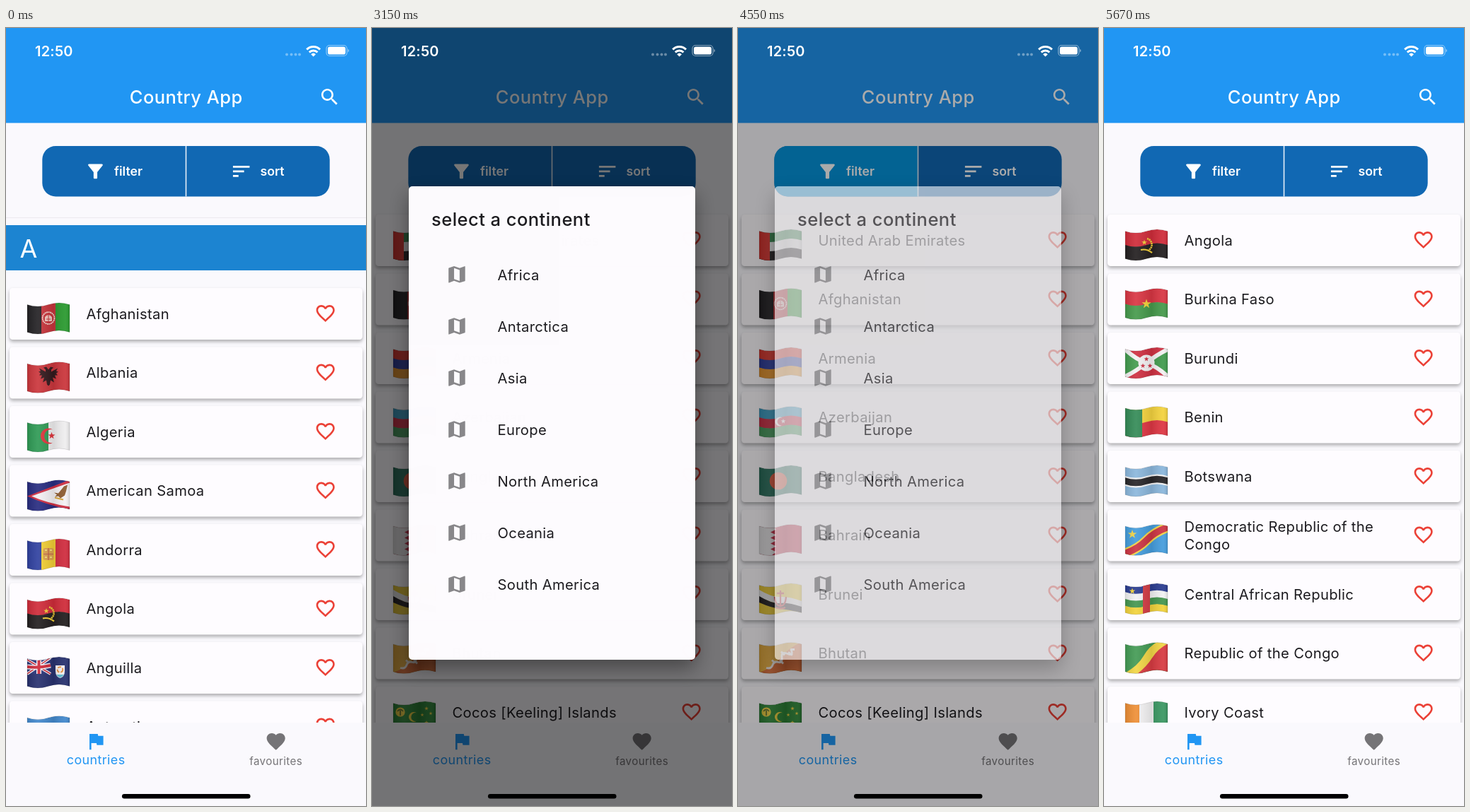
Write an HTML page that moves like this. It is 509 px wide and 1101 px high and loops after 5700 ms.

```html
<!DOCTYPE html>
<html lang="en">
<head>
<meta charset="utf-8">
<title>Country App</title>
<style>
html, body { margin: 0; width: 100%; height: 100%; overflow: hidden; background: #faf9fd; }
svg { display: block; width: 100vw; height: 100vh; }
text { font-family: Inter, Roboto, sans-serif; fill: #1c1b1f; white-space: pre; }
.label { font-size: 20.2px; letter-spacing: .33px; }
.title { font-size: 25.5px; font-weight: 500; letter-spacing: .46px; }
.button { font-size: 17.7px; font-weight: 600; }
.tab { text-anchor: middle; letter-spacing: .4px; }
.white { fill: #fff; }
.card { fill: #fefcff; filter: drop-shadow(0 3px 2.5px rgba(0, 0, 0, .3)); }
#barrier, #dialog, .list, .ripple { opacity: 0; }
.panel { fill: #fefcff; filter: drop-shadow(0 12px 14px rgba(0, 0, 0, .4)); }
</style>
</head>
<body>
<svg id="stage" viewBox="0 0 509 1101" xmlns="http://www.w3.org/2000/svg"></svg>
<script>
const LOOP = 5700;
const stage = document.getElementById('stage');

// Basic shapes
const shape = (d, fill, extra = '') => `<path d="${d}" fill="${fill}" ${extra}/>`;
const line = (d, color, width, extra = '') =>
  shape(d, 'none', `stroke="${color}" stroke-width="${width}" ${extra}`);
const rect = (x, y, w, h, fill, extra = '') =>
  `<rect x="${x}" y="${y}" width="${w}" height="${h}" fill="${fill}" ${extra}/>`;
const disc = (x, y, r, fill, extra = '') =>
  `<circle cx="${x}" cy="${y}" r="${r}" fill="${fill}" ${extra}/>`;
const text = (x, y, string, cls, extra = '') =>
  `<text x="${x}" y="${y}" class="${cls}" ${extra}>${string}</text>`;
const star = (x, y, r, fill) => {
  const points = Array.from({ length: 10 }, (_, i) => {
    const a = i * Math.PI / 5, q = i % 2 ? r * .4 : r;
    return `${(x + q * Math.sin(a)).toFixed(2)},${(y - q * Math.cos(a)).toFixed(2)}`;
  });
  return `<polygon points="${points.join(' ')}" fill="${fill}"/>`;
};
const crescent = (x, y, r, fill) => {
  const q = .86 * r, c = 1.66 * r;
  return shape(`M${x + .55 * r} ${y - c / 2}a${r} ${r} 0 1 0 0 ${c}a${q} ${q} 0 1 1 0 ${-c}z`, fill);
};

// Icons on a 24 unit grid
const HEART = 'M16.5 3c-1.74 0-3.41.81-4.5 2.09C10.91 3.81 9.24 3 7.5 3 4.42 3 2 5.42 2 8.5c0 3.78 3.4 6.86 8.55 11.54L12 21.35l1.45-1.32C18.6 15.36 22 12.28 22 8.5 22 5.42 19.58 3 16.5 3z';
const ICONS = {
  heart: HEART,
  heartLine: HEART + 'm-4.4 15.55l-.1.1-.1-.1C7.14 14.24 4 11.39 4 8.5 4 6.5 5.5 5 7.5 5c1.54 0 3.04.99 3.57 2.36h1.87C13.46 5.99 14.96 5 16.5 5c2 0 3.5 1.5 3.5 3.5 0 2.89-3.14 5.74-7.9 10.05z',
  filter: 'M4.25 5.61C6.27 8.2 10 13 10 13v6c0 .55.45 1 1 1h2c.55 0 1-.45 1-1v-6s3.72-4.8 5.74-7.39A1 1 0 0 0 18.95 4H5.04c-.83 0-1.3.95-.79 1.61z',
  sort: 'M3 18h6v-2H3zM3 6v2h18V6zm0 7h12v-2H3z',
  search: 'M15.5 14h-.79l-.28-.27C15.41 12.59 16 11.11 16 9.5 16 5.91 13.09 3 9.5 3S3 5.91 3 9.5 5.91 16 9.5 16c1.61 0 3.09-.59 4.23-1.57l.27.28v.79l5 4.99L20.49 19l-4.99-5zm-6 0C7.01 14 5 11.99 5 9.5S7.01 5 9.5 5 14 7.01 14 9.5 11.99 14 9.5 14z',
  flag: 'M14.4 6L14 4H5v17h2v-7h5.6l.4 2h7V6z',
  map: 'M20.5 3l-.16.03L15 5.1 9 3 3.36 4.9c-.21.07-.36.25-.36.48V20.5c0 .28.22.5.5.5l.16-.03L9 18.9l6 2.1 5.64-1.9c.21-.07.36-.25.36-.48V3.5c0-.28-.22-.5-.5-.5zM15 19l-6-2.11V5l6 2.11V19z'
};
const icon = (name, x, y, fill) =>
  shape(ICONS[name], fill, `fill-rule="evenodd" transform="translate(${x} ${y}) scale(1.305)"`);

// Waving flags, 60 wide: a dip on the left, a crest on the right
const wave = (y, h) => `M0 ${y}q15 5 30 0t30 0v${h}q-15-5-30 0t-30 0z`;
const TOP = 3.5, TALL = 39;
const rows = (...colors) => colors.map((c, i) =>
  shape(wave(TOP + TALL * i / colors.length, TALL / colors.length + .4), c)).join('');
const columns = (...colors) => colors.map((c, i) =>
  rect(60 * i / colors.length, 0, 60 / colors.length + .3, 46, c)).join('');
const mirrored = d => shape(d, '#33191d') + shape(d, '#33191d', 'transform="matrix(-1 0 0 1 60 0)"');

const angola = rows('#d02c3a', '#231f20') +
  line('M31 14a9 9 0 0 1 1 17', '#f2ce38', 2.6, 'stroke-dasharray="2.2 .7"') +
  line('M22 30q8-2 16 4', '#f2ce38', 2.2) + star(27, 19.5, 4, '#f2ce38');
const afghanistan = columns('#242225', '#c6343b', '#2b9a30') +
  disc(30, 22.5, 8.4, 'none', 'stroke="#f3dcd5" stroke-width="1.7" stroke-dasharray="2 .6"') +
  shape('M25 27v-6q5-6 10 0v6z', '#edc5bd') + line('M27 24h6M30 18v9', '#c6343b', 1);
const unionJack = '<g transform="translate(0 2)">' + rect(0, 0, 33, 23, '#29357b') +
  line('M0 3L33 23M33 0L0 23', '#f3f0f5', 4) + line('M0 3L33 23M33 0L0 23', '#cf2b3b', 1.5) +
  line('M16.5 0v23M0 13q16 2 33-2', '#f3f0f5', 7) + line('M16.5 0v23M0 13q16 2 33-2', '#cf2b3b', 4) + '</g>';

const FLAGS = {
  'Afghanistan': afghanistan,
  'Albania': rows('#cb363c') + mirrored('M30 12L27 8 23 9 26 12 26 15 17 10 19 14 16 15 19 17 17 20 21 20 19 25 24 23 22 30 27 27 28 33 30 35z'),
  'Algeria': columns('#2f9a55', '#efeeef') + crescent(30, 22.5, 11, '#e0343c') + star(34.5, 22, 5.2, '#e0343c'),
  'American Samoa': rows('#282c80') + shape('M60 1L0 24Q26 36 60 43z', '#cf2f42') + shape('M60 5L6 24Q28 34 60 39z', '#f4f1f4') +
    shape('M38 19l6 1 8-10 5-2-2 9-2 6-6 4-3-3-5 1 3-3z', '#8d5b31') + line('M39 26l12 3', '#d9a63b', 2),
  'Andorra': columns('#3041a0', '#f2cf35', '#d02d3f') +
    rect(22.5, 14, 15, 17, '#dda14f', 'rx="3"') + line('M30 14v17M23 22.5h14', '#c0624a', 1.2) +
    line('M25 17h3M32 17h3M25 27h3M32 27h3', '#f3dc7a', 2),
  'Angola': angola,
  'Anguilla': rows('#28316f') + unionJack +
    shape('M40 13h13v8q0 8-6.5 10Q40 29 40 21z', '#f3eff2') + shape('M41 26h11q-2 3-5.5 4.5Q43 29 41 26z', '#5fb9d0') +
    disc(46.5, 19, 3.8, 'none', 'stroke="#e89345" stroke-width="2" stroke-dasharray="5 2"'),
  'Antarctica': rows('#4389cd') + shape('M16 18l9-5 10 0 10 4-1 11-10 5-12-3-8-2z', '#f2f2f6'),
  'United Arab Emirates': rows('#37884f', '#f2f1f2', '#272427') + rect(0, 0, 15, 46, '#e23732'),
  'Armenia': rows('#e43a31', '#3040a4', '#f09a2f'),
  'Azerbaijan': rows('#40a4cc', '#d9344b', '#4ba262') + crescent(29, 22.5, 6.4, '#fff') + star(34, 22, 3.6, '#fff'),
  'Bangladesh': rows('#2c7561') + disc(27, 23, 12.3, '#e65b3f'),
  'Bahrain': rows('#c92f49') + shape('M0 0H16l8 8-8 4 8 4-8 4 8 4-8 4 8 4-8 4 8 4-8 6H0z', '#efedef'),
  'Brunei': rows('#f1cf38') + shape('M0 10Q18 21 30 20T60 26v10Q42 31 30 30T0 20z', '#f3f2f2') +
    shape('M0 19Q18 30 30 29T60 34v9Q42 38 30 37T0 28z', '#282527') +
    line('M22 20q1 13 8 13t8-13M30 11v21M25 15h10M23 35q7 3 14 0', '#cf3a3c', 2.3),
  'Bhutan': rows('#ecb040') + shape('M0 44Q20 36 30 23T60 0v47H0z', '#e0703a') +
    line('M10 37q7 2 9-4t8-4 5-7 8-5 5-6l5 0M22 30l-4-4M29 26l5 5M36 19l-5-5M41 15l6 4', '#f7f1ec', 2.8, 'stroke-linejoin="round"'),
  'Cocos [Keeling] Islands': rows('#2f8a39') + disc(10, 16, 6.6, '#f3d33e') +
    line('M10 21v-7M6 15q4-5 8 0', '#69772d', 1.8) + crescent(29, 23, 7, '#f3d33e') +
    star(47, 11, 3, '#f3d33e') + star(53, 18, 2.7, '#f3d33e') + star(41, 20, 2.7, '#f3d33e') + star(47, 31, 3, '#f3d33e'),
  'Burkina Faso': rows('#d93643', '#469a4c') + star(30, 23, 7, '#f5d23b'),
  'Burundi': rows('#cf3042') + shape('M0 3Q15 18 30 23 15 35 0 43zM60 3Q45 12 30 23 45 30 60 43z', '#429b4e') +
    line('M0 4Q15 18 30 23T60 42M60 4Q45 11 30 23T0 42', '#f3f1f2', 6) + disc(30, 23, 11.5, '#f3f1f2') +
    star(30, 17.5, 3.6, '#cf3042') + star(25, 27, 3.6, '#cf3042') + star(35, 27, 3.6, '#cf3042'),
  'Benin': rows('#f4d33f', '#de3744') + rect(0, 0, 24, 46, '#348b57'),
  'Botswana': rows('#8bb7dc') + shape(wave(16, 14), '#f3f3f4') + shape(wave(18.2, 9.6), '#282629'),
  'Democratic Republic of the|Congo': rows('#459ddd') + line('M-3 43Q18 36 30 23.5T63 4', '#f2d448', 14) +
    line('M-3 43Q18 36 30 23.5T63 4', '#cd3543', 9.5) + star(10, 15, 6.5, '#f2d448'),
  'Central African Republic': rows('#2b3d91', '#f2f2f3', '#459650', '#f2d33c') + rect(25, 0, 10, 46, '#d33c45') + star(10, 12, 4.5, '#f2d33c'),
  'Republic of the Congo': rows('#449b55') + shape('M0 44Q18 34 26 20T46 0H60V5L17 47H0z', '#f2d646') + shape('M15 47Q30 36 38 23T60 3v44z', '#d83b42'),
  'Ivory Coast': columns('#ee8f36', '#f3f2f3', '#3c9863')
};

const flag = (name, x, y) => `<g transform="translate(${x} ${y})">
  <g clip-path="url(#wave)">${FLAGS[name]}${rect(0, 0, 60, 46, 'url(#shade)')}</g>
  ${line(wave(TOP, TALL), 'rgba(0,0,0,.14)', .8)}</g>`;

const card = (name, y) => {
  const lines = name.split('|');
  const first = lines.length > 1 ? 31.5 : 43.8;
  return rect(5, y, 499, 73, '#fefcff', 'rx="4.5" class="card"') + flag(name, 30, y + 20) +
    lines.map((s, i) => text(113.5, y + first + 25 * i, s, 'label')).join('') +
    icon('heartLine', 436, y + 20.2, '#eb4137');
};
const list = (id, top, names, extra = '') =>
  `<g id="${id}" class="list">${extra}${names.map((n, i) => card(n, top + 83.5 * i)).join('')}</g>`;

const white = 'style="fill:#fff"';
const letterBand = rect(0, 268, 509, 1, '#eceaef') + rect(0, 279, 509, 64, '#1c84d1') +
  text(19.5, 325, 'A', '', white + ' font-size="36"');
const continents = ['Africa', 'Antarctica', 'Asia', 'Europe', 'North America', 'Oceania', 'South America'];

stage.innerHTML = `
<defs>
  <clipPath id="wave"><path d="${wave(TOP, TALL)}"/></clipPath>
  <clipPath id="filterHalf"><path d="M254 167H70.3a19 19 0 0 0-19 19v33.5a19 19 0 0 0 19 19H254z"/></clipPath>
  <linearGradient id="shade">
    <stop offset="0" stop-opacity=".1"/>
    <stop offset=".25" stop-color="#fff" stop-opacity=".08"/>
    <stop offset=".62" stop-opacity=".1"/>
    <stop offset=".9" stop-color="#fff" stop-opacity=".06"/>
    <stop offset="1" stop-opacity=".12"/>
  </linearGradient>
</defs>
${rect(0, 0, 509, 1101, '#faf9fd')}
${list('letterA', 368, ['Afghanistan', 'Albania', 'Algeria', 'American Samoa', 'Andorra', 'Angola', 'Anguilla', 'Antarctica'], letterBand)}
${list('asia', 264, ['United Arab Emirates', 'Afghanistan', 'Armenia', 'Azerbaijan', 'Bangladesh', 'Bahrain', 'Brunei', 'Bhutan', 'Cocos [Keeling] Islands'])}
${list('africa', 264, ['Angola', 'Burkina Faso', 'Burundi', 'Benin', 'Botswana', 'Democratic Republic of the|Congo', 'Central African Republic', 'Republic of the Congo', 'Ivory Coast'])}

${rect(0, 0, 509, 134.4, '#2196f3')}
${text(254.7, 106.5, 'Country App', 'title', white + ' text-anchor="middle"')}
${icon('search', 442, 82, '#fff')}
${rect(51.3, 167, 406.4, 71.5, '#1168b3', 'rx="19"')}
<g clip-path="url(#filterHalf)">
  ${disc(174, 236, 33, '#03a1e8', 'class="ripple" id="firstTap"')}
  ${disc(174, 236, 33, '#03a1e8', 'class="ripple" id="secondTap"')}
</g>
${rect(253.7, 167, 1.6, 71.5, '#e6eff8')}
${icon('filter', 110.8, 187.2, '#fff')}${text(153, 209, 'filter', 'button', white)}
${icon('sort', 317, 187.2, '#fff')}${text(359.5, 209, 'sort', 'button', white)}

${rect(0, 983, 509, 118, '#faf9fd')}
${icon('flag', 111.5, 993.8, '#2196f3')}
${text(127.2, 1042, 'countries', 'tab', 'font-size="17.9" style="fill:#2196f3"')}
${icon('heart', 366, 994, '#757477')}
${text(381.6, 1042.5, 'favourites', 'tab', 'font-size="15.1" style="fill:#757477"')}
${rect(164, 1084, 181.5, 6.5, '#000', 'rx="3.2"')}

${rect(0, 0, 509, 1101, '#000', 'id="barrier"')}
<g id="dialog">
  ${rect(52, 224, 405, 670, '#fefcff', 'rx="5" class="panel"')}
  ${text(84, 280, 'select a continent', 'title')}
  ${continents.map((name, i) => icon('map', 104.3, 333.2 + 73.05 * i, '#89888b') +
    text(177.5, 356.5 + 73.05 * i, name, 'label')).join('')}
</g>

${text(41, 40, '12:50', '', white + ' font-size="20" font-weight="600" letter-spacing=".2"')}
${[397, 403.5, 409.5, 415].map(x => disc(x, 37.5, 2, '#fff', 'opacity=".38"')).join('')}
${line('M425.2 30.4a13.5 13.5 0 0 1 18.8 0M428.8 34.4a8.2 8.2 0 0 1 11.600 0', '#fff', 3)}
${shape('M431.2 37.2a5 5 0 0 1 6.8 0l-3.4 3.3z', '#fff')}
${rect(453, 24.5, 29, 15, 'none', 'rx="4.5" stroke="#fff" stroke-opacity=".5" stroke-width="1.2"')}
${rect(455, 26.5, 25, 11, '#fff', 'rx="2.8"')}
${shape('M483.5 29.5q3 2.5 0 5z', '#fff', 'opacity=".55"')}`;

// Each step is [ms, value]; a repeated time makes a hard change.
function play(id, prop, steps, unit = '') {
  const all = [[0, steps[0][1]], ...steps, [LOOP, steps.at(-1)[1]]];
  document.getElementById(id).animate(
    all.map(([ms, value]) => ({ offset: ms / LOOP, [prop]: value + unit })),
    { duration: LOOP, iterations: Infinity });
}

const ASIA = 3145, AFRICA = 5480;
play('letterA', 'opacity', [[ASIA, 1], [ASIA, 0]]);
play('asia', 'opacity', [[ASIA, 0], [ASIA, 1], [AFRICA, 1], [AFRICA, 0]]);
play('africa', 'opacity', [[AFRICA, 0], [AFRICA, 1]]);

const open = start => [[start, 0], [start + 40, .42], [start + 80, .76], [start + 120, .965], [start + 150, 1]];
const fades = [
  ...open(1820), [3150, 1], [3180, .85], [3210, .6], [3240, .3], [3270, 0],
  ...open(4490), [5510, 1], [5560, .84], [5600, .6], [5640, .28], [5670, 0]
];
play('dialog', 'opacity', fades);
play('barrier', 'opacity', fades.map(([ms, v]) => [ms, .54 * Math.min(1, v * 1.03)]));

function tap(id, start, end) {
  play(id, 'opacity', [[start, 0], [start, .17], [start + 100, .6], [start + 180, 1], [start + 230, .9], [end, 0]]);
  play(id, 'r', [[start, 33], [start + 100, 95], [start + 180, 190]], 'px');
}
tap('firstTap', 1790, 2300);
tap('secondTap', 4415, 4880);
</script>
</body>
</html>
```
